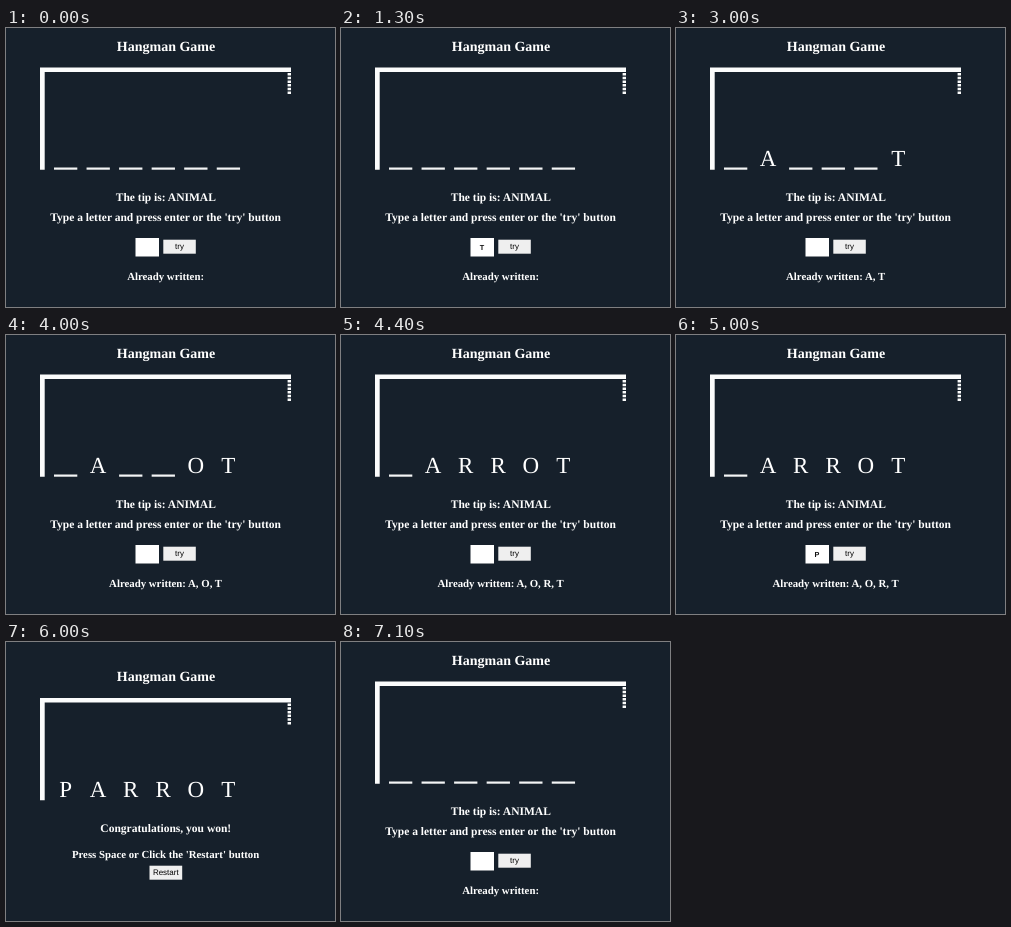
An HTML page for the animation above (8 s loop, 329x279 px).

```html
<!DOCTYPE html>
<html lang="en">
<head>
<meta charset="utf-8">
<title>Hangman Game</title>
<style>
html, body { margin: 0; width: 100%; height: 100%; overflow: hidden; background: #16202b; }
svg { display: block; width: 100%; height: 100%; text-rendering: geometricPrecision; }
text { text-anchor: middle; fill: #fff; }
.title, .line, .small { font-family: "Liberation Serif", Times, serif; font-weight: bold; }
.title { font-size: 14px; }
.line { font-size: 11.53px; }
.small { font-size: 10.8px; }
.letter { font: 23px "Liberation Serif", Times, serif; }
.button { font: 8px "Liberation Sans", Arial, sans-serif; fill: #000; }
.typed { font: bold 7.3px "Liberation Sans", Arial, sans-serif; fill: #111; }
.wood { fill: #fbfcfc; }

/* Every change is a hard cut; --on switches a part, dashes use its inverse. */
.cut { --on: 0; animation: 8s step-end infinite; }
.typed, .written, .screen { opacity: var(--on); }
.slot .letter { opacity: var(--on); }
.slot .dash { opacity: calc(1 - var(--on)); fill: #f4f5f6; }

#board { animation-name: drop; }
#play { animation-name: play; }
#win, .got-p { animation-name: win; }
.got-t { animation-name: gotT; }
.got-a { animation-name: gotA; }
.got-o { animation-name: gotO; }
.got-r { animation-name: gotR; }
.type-t { animation-name: typeT; }
.type-a { animation-name: typeA; }
.type-o { animation-name: typeO; }
.type-r { animation-name: typeR; }
.type-p { animation-name: typeP; }
.list-0 { animation-name: list0; }
.list-1 { animation-name: list1; }
.list-2 { animation-name: list2; }
.list-3 { animation-name: list3; }
.list-4 { animation-name: gotR; }

@keyframes drop { 0%, 88.75%, 100% { transform: none } 72.5% { transform: translateY(16.5px) } }
@keyframes play { 0%, 88.75%, 100% { --on: 1 } 72.5% { --on: 0 } }
@keyframes win { 0%, 88.75%, 100% { --on: 0 } 72.5% { --on: 1 } }

@keyframes gotT { 0%, 88.75%, 100% { --on: 0 } 23.75% { --on: 1 } }
@keyframes gotA { 0%, 88.75%, 100% { --on: 0 } 31.25% { --on: 1 } }
@keyframes gotO { 0%, 88.75%, 100% { --on: 0 } 50% { --on: 1 } }
@keyframes gotR { 0%, 88.75%, 100% { --on: 0 } 55% { --on: 1 } }

@keyframes typeT { 0%, 23.75%, 100% { --on: 0 } 16.25% { --on: 1 } }
@keyframes typeA { 0%, 31.25%, 100% { --on: 0 } 30% { --on: 1 } }
@keyframes typeO { 0%, 50%, 100% { --on: 0 } 47.5% { --on: 1 } }
@keyframes typeR { 0%, 55%, 100% { --on: 0 } 53.75% { --on: 1 } }
@keyframes typeP { 0%, 72.5%, 100% { --on: 0 } 61.25% { --on: 1 } }

@keyframes list0 { 0%, 88.75%, 100% { --on: 1 } 23.75% { --on: 0 } }
@keyframes list1 { 0%, 31.25%, 100% { --on: 0 } 23.75% { --on: 1 } }
@keyframes list2 { 0%, 50%, 100% { --on: 0 } 31.25% { --on: 1 } }
@keyframes list3 { 0%, 55%, 100% { --on: 0 } 50% { --on: 1 } }
</style>
</head>
<body>
<svg viewBox="0 0 329 279">
  <g id="board" class="cut">
    <text class="title" x="160" y="22.5">Hangman Game</text>
    <path class="wood" d="M34 39.5H285V44H38.7V141.7H34Z"/>
    <path d="M283.3 45V66" stroke="#fbfcfc" stroke-width="3.4" stroke-dasharray="2.5 1.2"/>
    <g class="slot cut got-p" id="slot">
      <rect class="dash" x="48" y="139.5" width="23.3" height="2.2"/>
      <text class="letter" x="59.6" y="138">P</text>
    </g>
    <g transform="translate(32.55)"><g class="slot cut got-a">
      <rect class="dash" x="48" y="139.5" width="23.3" height="2.2"/>
      <text class="letter" x="59.6" y="138">A</text>
    </g></g>
    <g transform="translate(65.1)"><g class="slot cut got-r">
      <rect class="dash" x="48" y="139.5" width="23.3" height="2.2"/>
      <text class="letter" x="59.6" y="138">R</text>
    </g></g>
    <g transform="translate(97.65)"><g class="slot cut got-r">
      <rect class="dash" x="48" y="139.5" width="23.3" height="2.2"/>
      <text class="letter" x="59.6" y="138">R</text>
    </g></g>
    <g transform="translate(130.2)"><g class="slot cut got-o">
      <rect class="dash" x="48" y="139.5" width="23.3" height="2.2"/>
      <text class="letter" x="59.6" y="138">O</text>
    </g></g>
    <g transform="translate(162.75)"><g class="slot cut got-t">
      <rect class="dash" x="48" y="139.5" width="23.3" height="2.2"/>
      <text class="letter" x="59.6" y="138">T</text>
    </g></g>
  </g>

  <g id="play" class="screen cut">
    <text class="line" x="159.8" y="173">The tip is: ANIMAL</text>
    <text class="line" x="159.6" y="193.3">Type a letter and press enter or the 'try' button</text>
    <rect x="129.5" y="210" width="23.5" height="18.5" fill="#fff"/>
    <text class="typed cut type-t" x="141" y="221.8">T</text>
    <text class="typed cut type-a" x="141" y="221.8">A</text>
    <text class="typed cut type-o" x="141" y="221.8">O</text>
    <text class="typed cut type-r" x="141" y="221.8">R</text>
    <text class="typed cut type-p" x="141" y="221.8">P</text>
    <rect x="157.3" y="211.7" width="32.5" height="14" fill="#efefef"/>
    <text class="button" x="173.5" y="221">try</text>
    <text class="small written cut list-0" x="159.6" y="252">Already written:</text>
    <text class="small written cut list-1" x="159.6" y="252">Already written: T</text>
    <text class="small written cut list-2" x="159.6" y="252">Already written: A, T</text>
    <text class="small written cut list-3" x="159.6" y="252">Already written: A, O, T</text>
    <text class="small written cut list-4" x="159.6" y="252">Already written: A, O, R, T</text>
  </g>

  <g id="win" class="screen cut">
    <text class="line" x="159.8" y="190">Congratulations, you won!</text>
    <text class="small" x="159.6" y="216.3">Press Space or Click the 'Restart' button</text>
    <rect x="143.5" y="223.7" width="32.7" height="14" fill="#efefef"/>
    <text class="button" x="159.8" y="233.4">Restart</text>
  </g>
</svg>
</body>
</html>
```
